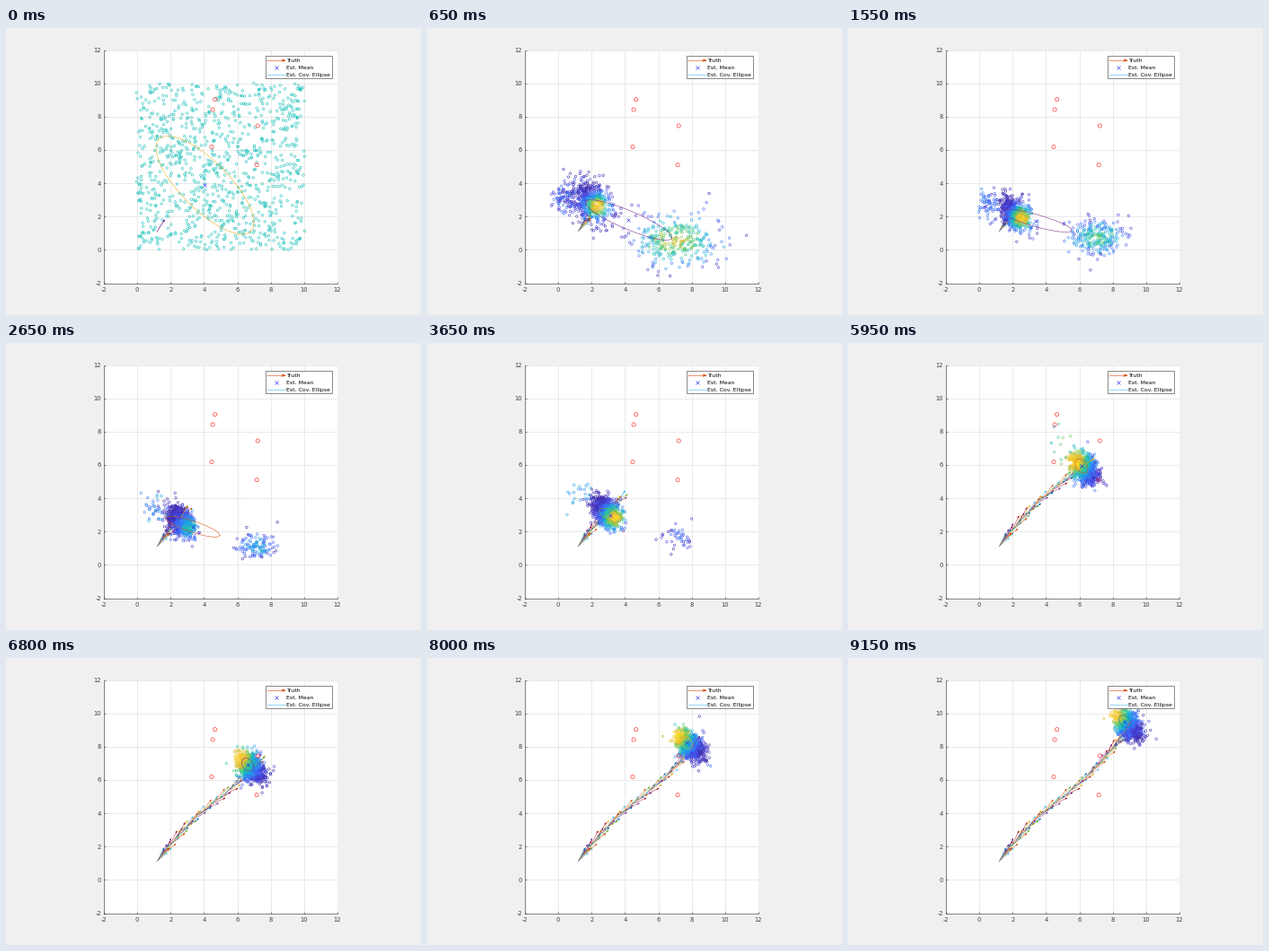
Recreate the animation shown at these times as a matplotlib script. Size 462x320 px, loop 9.3 s.

```python
import numpy as np
import matplotlib.pyplot as plt
from matplotlib.animation import FuncAnimation
from matplotlib.collections import LineCollection
from matplotlib.colors import LinearSegmentedColormap
from matplotlib.patches import Rectangle

W, H, DPI = 462, 320, 100
PX = 72 / DPI                      # points per pixel
TICK_MS, LOOP_MS = 50, 9300
END = 9.15                         # last update, seconds
N = 1000
INK = "#404040"
plt.rcParams["font.family"] = "DejaVu Sans"

CYCLE = ["#0072bd", "#d95319", "#edb120", "#7e2f8e",
         "#77ac30", "#4dbeee", "#a2142f"]
PARULA = LinearSegmentedColormap.from_list("weights", [
    "#3e26a8", "#4640dc", "#4367fd", "#2e87f7", "#1ca9df",
    "#12beb9", "#3dc98b", "#8fcb4c", "#d9ba30", "#fec338", "#f9e01e"])

# Filter updates come at a steady rate with one pause, snapped to the tick
STEPS = np.concatenate([[0], np.linspace(50, 1150, 14),
                        np.linspace(1550, 9150, 82)]) // TICK_MS * TICK_MS / 1000

# Way of the main cloud: seconds, x, y
PATH = np.array([(0, 1.9, 3.3), (1.55, 2.15, 2.2), (2.65, 2.6, 2.6), (3.65, 2.9, 3.2),
                 (5.1, 5.8, 4.75), (6.8, 6.8, 6.75), (9.15, 8.95, 9.3)])
LANDMARKS = np.array([(4.66, 9.03), (4.52, 8.42), (4.46, 6.18),
                      (7.22, 7.45), (7.16, 5.1)])

base = np.random.default_rng(4)
RANK = base.random(N)
START = base.random((N, 2)) * 10 + base.normal(0, .05, (N, 2))
Z0 = base.normal(size=(N, 2)) * np.where(base.random((N, 1)) < .1, 1.4, 1)


def unit(a):
    return np.array([np.cos(a), np.sin(a)])


def truth(t):
    """True position: slow start, slight S-curve along the diagonal."""
    u = t / END
    s = u - .07 * np.sin(2 * np.pi * u) - .03 * np.sin(np.pi * u)
    return np.array([1.17 + 7.43 * s, 1.08 + 7.62 * s + .3 * np.sin(2 * np.pi * s)])


def arrow(k, t):
    """Velocity arrow of the true state as one polyline."""
    p = truth(t)
    dx, dy = truth(t + .3) - p
    a = np.arctan2(dy, dx) + .25 * np.sin(1.9 * k + .4)
    tip = p + (.85 + .12 * np.sin(2.7 * k)) * unit(a)
    return np.array([p, tip, tip - .12 * unit(a + .3), tip, tip - .12 * unit(a - .3)])


def cloud(k, t):
    """Particle positions, colour values and weights after update k."""
    if k == 0:
        x, y = START.T
        weight = np.exp(-(x + y - 6.5)**2 / 14) * (1 + (x - y)**2 / 12)
        return START, np.full(N, .5), weight

    rng = np.random.default_rng(100 + k)
    z = .8 * Z0 + .6 * rng.normal(size=(N, 2))
    center = np.array([np.interp(t, PATH[:, 0], PATH[:, c]) for c in (1, 2)])
    spread = .4 + .7 * np.exp(-t / .5)
    pos = center + spread * np.column_stack([z[:, 0], z[:, 1] - .4 * z[:, 0]])

    # The likely side swings from lower right to upper left
    turn = np.tanh((4.7 - t) / .8)
    hot = center + (.3 + .07 * t) * turn * np.array([1, -.7])
    reach = .65 - .15 * turn
    peak = .95 - .45 * np.exp(-((t - 2.65) / .5)**2)
    val = peak * np.exp(-((pos - hot)**2).sum(1) / (2 * reach**2))

    # A second guess at the lower right dies out
    if t < 4.85:
        far = RANK < .37 * np.exp(-(t / 2.6)**2)
        wide = .3 + np.exp(-t / 1.4)
        pos[far] = (7 + .05 * t, .5 + .09 * t**2) + z[far] * (1.3 * wide, .8 * wide)
        val[far] = (.85 - .18 * t) * np.exp(-(z[far]**2).sum(1) / 4)
    # A few stragglers trail on the left
    if t < 6:
        late = RANK > 1 - .12 * np.exp(-t / 2.2)
        pos[late] = center + (-1.5, .3 * t) + z[late] * (.4, .45)
        val[late] = .1 + .08 * t
    val = np.clip(val + rng.normal(0, .08, N), 0, 1)
    return pos, val, val


def covariance_ellipse(pos, weight):
    mid = np.average(pos, axis=0, weights=weight)
    root = np.linalg.cholesky(np.cov(pos.T, aweights=weight))
    return mid, mid[:, None] + root @ unit(np.linspace(0, 2 * np.pi, 90))


ARROWS = [arrow(k, t) for k, t in enumerate(STEPS)]
ARROW_COLORS = [CYCLE[(k + 3) % 7] for k in range(len(STEPS))]

fig = plt.figure(figsize=(W / DPI, H / DPI), dpi=DPI, facecolor="#f0f0f0")
ax = fig.add_axes([109 / W, 35.5 / H, 260 / W, 260 / H])
ticks = range(-2, 13, 2)
ax.set(xlim=(-2, 12), ylim=(-2, 12), xticks=ticks, yticks=ticks)
ax.set_xticklabels([str(v) for v in ticks])
ax.set_yticklabels([str(v) for v in ticks])
ax.set_axisbelow(True)
ax.grid(color="#e2e2e2", lw=.7 * PX)
for side in ("top", "right"):
    ax.spines[side].set_visible(False)
for side in ("left", "bottom"):
    ax.spines[side].set(color=INK, linewidth=.6 * PX)
ax.tick_params(direction="in", length=2.5 * PX, width=.6 * PX, pad=3 * PX,
               color=INK, labelcolor=INK, labelsize=6.8 * PX)
ax.tick_params(axis="x", pad=4 * PX)

trail = LineCollection([], linewidths=.45 * PX, zorder=3)
ax.add_collection(trail)
dots = ax.scatter(*START.T, s=(2.5 * PX)**2, facecolors="none",
                  linewidths=.55 * PX, zorder=4)
ax.scatter(*LANDMARKS.T, s=(4.2 * PX)**2, facecolors="none",
           edgecolors="#ff3030", linewidths=.65 * PX, zorder=5)
cross = dict(color="#2020ff", ms=3.4 * PX, mew=.55 * PX)
now, = ax.plot([], [], lw=.5 * PX, zorder=6)
ring, = ax.plot([], [], lw=.55 * PX, zorder=6)
mean, = ax.plot([], [], "x", zorder=7, **cross)

# Legend, in pixels
ui = fig.add_axes([0, 0, 1, 1], zorder=5)
ui.set(xlim=(0, W), ylim=(H, 0))
ui.axis("off")
ui.add_patch(Rectangle((289, 31), 73.5, 24.5, fc="white", ec=INK, lw=.6 * PX))
ROWS = [(36.3, "Truth"), (44.2, "Est. Mean"), (52.1, "Est. Cov. Ellipse")]
for y, label in ROWS:
    ui.text(312.5, y, label, fontsize=6.1 * PX, va="center_baseline", color="black")
y_truth, y_mean, y_ring = (y for y, _ in ROWS)
ui.plot([291, 311, 307, 311, 307],
        y_truth + np.array([0, 0, -1.2, 0, 1.2]), color=CYCLE[1], lw=.6 * PX)
ui.plot([300.5], [y_mean], "x", **cross)
ui.plot([291, 311], [y_ring, y_ring], color=CYCLE[5], lw=.6 * PX)


def draw(i):
    clock = i * TICK_MS / 1000
    k = int(np.searchsorted(STEPS, clock + 1e-6, side="right")) - 1
    pos, val, weight = cloud(k, STEPS[k])
    dots.set_offsets(pos)
    dots.set_edgecolors(PARULA(val))
    trail.set_segments(ARROWS[:k + 1])
    trail.set_color(ARROW_COLORS[:k + 1])
    now.set_data(*ARROWS[k].T)
    now.set_color(ARROW_COLORS[k])
    mid, outline = covariance_ellipse(pos, weight)
    ring.set_data(*outline)
    ring.set_color(CYCLE[(k + 2) % 7])
    mean.set_data([mid[0]], [mid[1]])
    return trail, dots, now, ring, mean


anim = FuncAnimation(fig, draw, frames=LOOP_MS // TICK_MS, interval=TICK_MS,
                     repeat=True, repeat_delay=0, blit=False)
plt.show()
```
